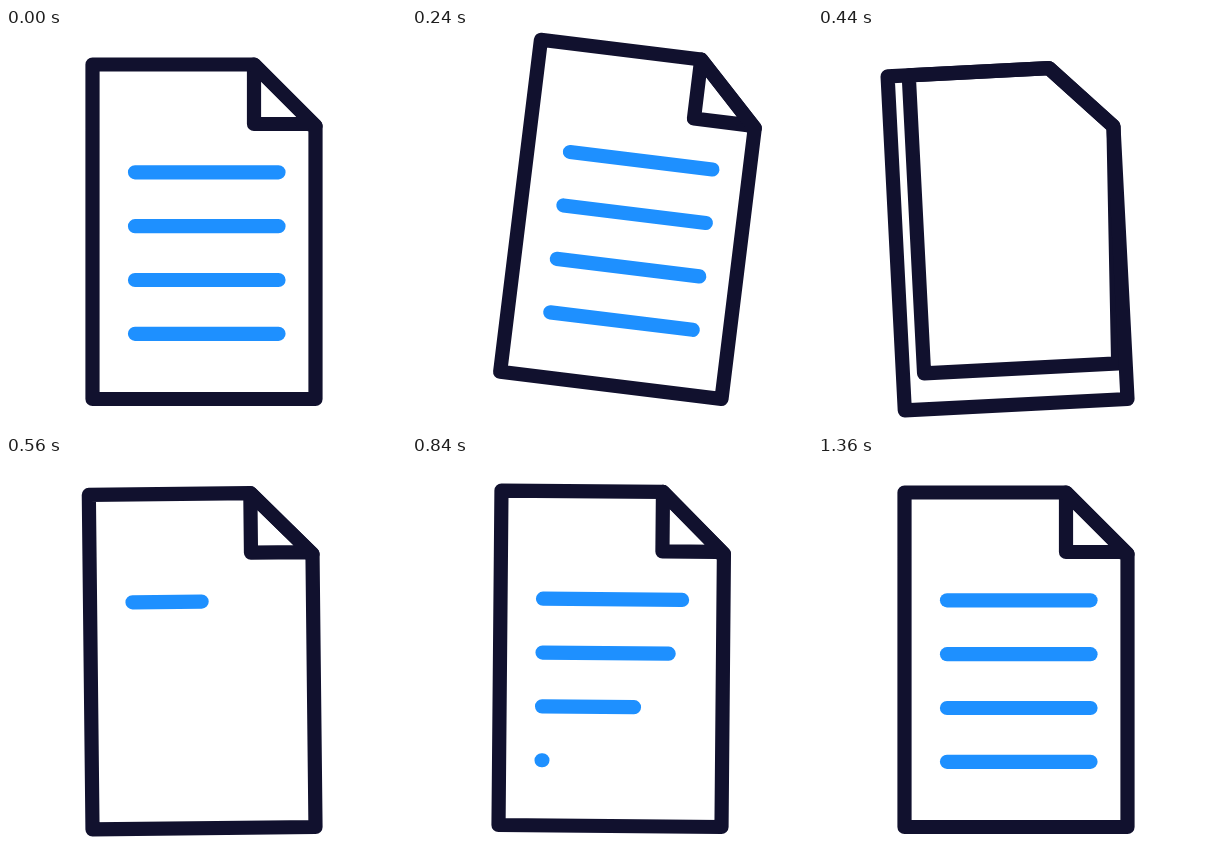
An HTML page that plays this animation: 400x400 px, repeating every 1.96 s.

```html
<!DOCTYPE html>
<html>
<head>
<meta charset="utf-8">
<style>
  html, body { margin: 0; height: 100%; overflow: hidden; background: #fff; }
  svg { display: block; width: 100%; height: 100%; }
</style>
</head>
<body>
<svg viewBox="0 0 400 400" fill="none" stroke="#11112e" stroke-width="14.2" stroke-linecap="round" stroke-linejoin="round">
  <g id="page">
    <g id="lines" stroke="#1e90ff"></g>
    <path id="fold" fill="#fff"/>
    <path d="M86.5 36.5H248L309.5 98V371H86.5Z"/>
  </g>
</svg>
<script>
const LOOP = 1960, TURN_START = 240, TURN_END = 500;
const LINE_START = 480, LINE_STAGGER = 120, LINE_TIME = 520, LINE_LENGTH = 143.5;
const TILT = [[0, 0], [240, 7], [450, -3], [680, 2], [920, 0]];  // [ms, degrees]

const page = document.getElementById('page');
const fold = document.getElementById('fold');
const group = document.getElementById('lines');
const lines = [0, 1, 2, 3].map(() =>
  group.appendChild(document.createElementNS('http://www.w3.org/2000/svg', 'path')));

const progress = (t, start, end) => Math.min(1, Math.max(0, (t - start) / (end - start)));
const smooth = u => u * u * (3 - 2 * u);
const bezier = (a, b, p) => 3 * (1 - p) ** 2 * p * a + 3 * (1 - p) * p * p * b + p ** 3;

// Fast start, long soft landing
function easeOut(u) {
  let low = 0, high = 1;
  for (let i = 0; i < 20; i++) {
    const mid = (low + high) / 2;
    if (bezier(0.167, 0.2, mid) < u) low = mid; else high = mid;
  }
  return bezier(0.5, 1, high);
}

function tiltAt(t) {
  let angle = 0;
  for (let i = 1; i < TILT.length; i++) {
    const [start, from] = TILT[i - 1], [end, to] = TILT[i];
    angle += (to - from) * smooth(progress(t, start, end));
  }
  return angle;
}

function draw(t) {
  page.setAttribute('transform', `rotate(${tiltAt(t)} 309.5 371)`);

  // The folded corner sweeps over the whole sheet, then a fresh sheet shows
  const turn = t < TURN_END ? smooth(progress(t, TURN_START, TURN_END)) : 0;
  const x = 248 - 161.5 * turn, y = 96 + 275 * turn;
  fold.setAttribute('d', `M248 36.5H${x}V${y}H302L309.5 98Z`);

  lines.forEach((line, i) => {
    const start = LINE_START + i * LINE_STAGGER;
    const grown = t < LINE_START ? 1 : progress(t, start, start + LINE_TIME);
    const length = LINE_LENGTH * (grown < 1 ? easeOut(grown) : 1);
    line.setAttribute('d', grown ? `M129 ${144.3 + 53.85 * i}h${length}` : '');
  });
}

const begin = performance.now();
function frame() {
  draw((performance.now() - begin) % LOOP);
  requestAnimationFrame(frame);
}
frame();
</script>
</body>
</html>
```
